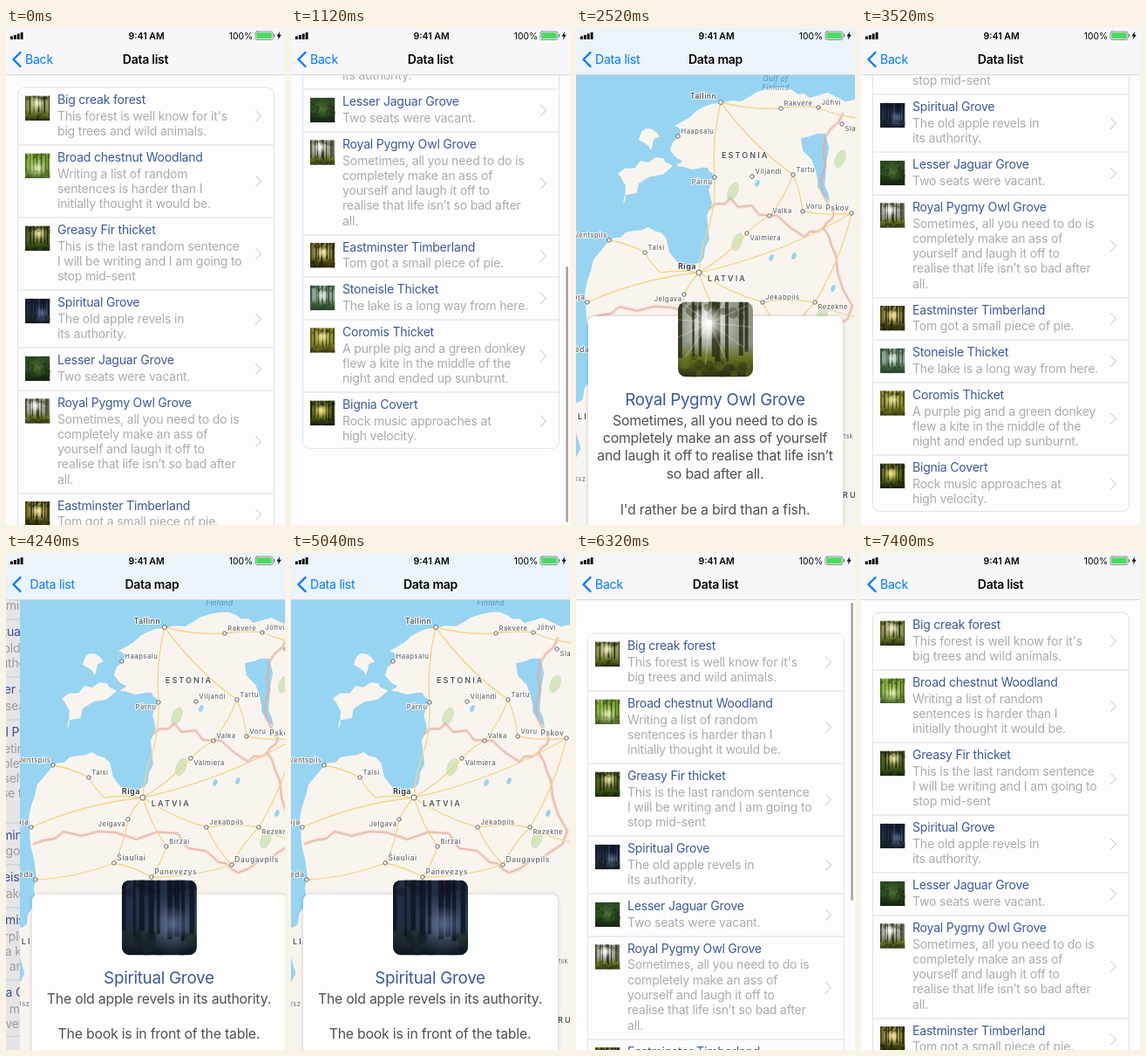
These frames come from a looping animation (320 px wide and 569 px high, 7.44 s). An HTML page with a canvas:

```html
<!DOCTYPE html>
<html lang="en">
<head>
<meta charset="utf-8">
<title>Data list</title>
<style>
html, body { margin: 0; width: 100%; height: 100%; overflow: hidden; background: #fdfcfe; }
canvas { display: block; position: absolute; left: 0; top: 0; width: 320px; height: 569px; }
</style>
</head>
<body>
<canvas id="stage"></canvas>
<script>
const W = 320, H = 569, LOOP = 7440, BAR = 54, MAX = 224;
const FONT = 'Inter, "Liberation Sans", sans-serif';
const canvas = document.getElementById('stage');
const ctx = canvas.getContext('2d');
const dpr = Math.max(1, window.devicePixelRatio || 1);
canvas.width = W * dpr;
canvas.height = H * dpr;

const items = [];
let listEnd = 68;
// look: sky, floor, trunk, light; lx, ly: centre of the light
function item(name, lines, look, lx, ly, trunks = 7) {
  const h = 31.3 + 17.3 * lines.length;
  items.push({ name, lines, look, lx, ly, trunks, top: listEnd, h });
  listEnd += h;
}
item('Big creak forest', ["This forest is well know for it's", 'big trees and wild animals.'],
  ['#8a8f4a', '#5d6d22', '#23260f', '#f4efc4'], .5, .3);
item('Broad chestnut Woodland', ['Writing a list of random', 'sentences is harder than I', 'initially thought it would be.'],
  ['#86b03e', '#6f8f3a', '#38501b', '#e2efb4'], .5, .6);
item('Greasy Fir thicket', ['This is the last random sentence', 'I will be writing and I am going to', 'stop mid-sent'],
  ['#4c5d1c', '#39511a', '#161c0a', '#f0eba4'], .55, .3);
item('Spiritual Grove', ['The old apple revels in', 'its authority.'],
  ['#222d46', '#1c2c2c', '#0f1522', '#5c6f92'], .68, .58, 9);
item('Lesser Jaguar Grove', ['Two seats were vacant.'],
  ['#2c4a20', '#1d3416', '#12220e', '#4d7034'], .5, .45, 0);
item('Royal Pygmy Owl Grove', ['Sometimes, all you need to do is', 'completely make an ass of', 'yourself and laugh it off to',
  'realise that life isn\u2019t so bad after', 'all.'],
  ['#8c9684', '#687221', '#2c2c13', '#ffffff'], .42, .28, 8);
item('Eastminster Timberland', ['Tom got a small piece of pie.'],
  ['#756f2c', '#4a4a16', '#1e1d0b', '#ffefa8'], .5, .38);
item('Stoneisle Thicket', ['The lake is a long way from here.'],
  ['#7fa08c', '#42683d', '#263a2a', '#dcebdc'], .5, .4);
item('Coromis Thicket', ['A purple pig and a green donkey', 'flew a kite in the middle of the', 'night and ended up sunburnt.'],
  ['#8c8c2a', '#686c1e', '#35360f', '#eee49c'], .5, .35);
item('Bignia Covert', ['Rock music approaches at', 'high velocity.'],
  ['#4b5716', '#3d4a10', '#13180a', '#f8ea80'], .45, .4);
listEnd -= 1.6;

const details = {
  3: { y: 391, gulf: 50, lines: ['The old apple revels in its authority.', '', 'The book is in front of the table.'] },
  5: { y: 330, gulf: 61, lines: ['Sometimes, all you need to do is', 'completely make an ass of yourself',
    'and laugh it off to realise that life isn\u2019t', 'so bad after all.', '', "I'd rather be a bird than a fish."] }
};

// Motion
const clamp = v => Math.min(1, Math.max(0, v));
const prog = (t, a, b) => clamp((t - a) / (b - a));
const lerp = (a, b, p) => a + (b - a) * p;
const out = p => 1 - Math.pow(1 - p, 3);
const soft = p => p * p * (3 - 2 * p);

function scrollAt(t) {
  if (t < 1120) return 296 * out(prog(t, 770, 1120));
  if (t < 5960) return lerp(296, MAX, soft(prog(t, 1120, 1560)));
  if (t < 6320) return lerp(MAX, -24, out(prog(t, 5960, 6320)));
  return lerp(-24, 0, soft(prog(t, 6320, 6680)));
}
const thumbAlpha = t => t < 4000
  ? prog(t, 770, 830) * (1 - prog(t, 1560, 1800))
  : prog(t, 5960, 6020) * (1 - prog(t, 6660, 6900));
const visit = (t, a, b) => out(prog(t, a, a + 460)) - out(prog(t, b, b + 440));

// Drawing helpers
function text(s, x, y, size, color, o = {}) {
  ctx.font = `${o.style || ''} ${o.weight || 400} ${size}px ${FONT}`;
  ctx.letterSpacing = (o.gap || 0) + 'px';
  ctx.textAlign = o.align || 'left';
  if (o.halo) {
    ctx.strokeStyle = o.halo;
    ctx.lineWidth = 2;
    ctx.lineJoin = 'round';
    ctx.strokeText(s, x, y);
  }
  ctx.fillStyle = color;
  ctx.fillText(s, x, y);
}
function box(x, y, w, h, r) {
  ctx.beginPath();
  ctx.roundRect(x, y, w, h, r);
}
function rect(x, y, w, h, color) {
  ctx.fillStyle = color;
  ctx.fillRect(x, y, w, h);
}
function trace(pts) {
  ctx.beginPath();
  for (let i = 0; i < pts.length; i += 2) ctx.lineTo(pts[i], pts[i + 1]);
}
function stroke(color, width) {
  ctx.strokeStyle = color;
  ctx.lineWidth = width;
  ctx.lineJoin = ctx.lineCap = 'round';
  ctx.stroke();
}
function line(pts, color, width) {
  trace(pts);
  stroke(color, width);
}
function area(pts, color) {
  trace(pts);
  ctx.closePath();
  ctx.fillStyle = color;
  ctx.fill();
}
function rng(seed) {
  return () => (seed = (seed * 16807) % 2147483647) / 2147483647;
}
// Splits every segment in three with small seeded side steps
function ragged(pts, seed, amount = .22) {
  const rand = rng(seed * 7919), res = [];
  for (let i = 0; i < pts.length - 2; i += 2) {
    const [x, y, x2, y2] = pts.slice(i, i + 4);
    res.push(x, y);
    for (const k of [1 / 3, 2 / 3]) {
      const side = (rand() - .5) * amount;
      res.push(lerp(x, x2, k) - (y2 - y) * side, lerp(y, y2, k) + (x2 - x) * side);
    }
  }
  return [...res, ...pts.slice(-2)];
}

function forest(index, x, y, size, radius) {
  const { look: [sky, floor, trunk, light], lx, ly, trunks } = items[index];
  const rand = rng(index * 977 + 31);
  ctx.save();
  box(x, y, size, size, radius);
  ctx.clip();
  ctx.translate(x, y);
  ctx.scale(size, size);
  const g = ctx.createLinearGradient(0, 0, 0, 1);
  g.addColorStop(0, sky);
  g.addColorStop(.55, sky);
  g.addColorStop(.75, floor);
  g.addColorStop(1, trunk);
  rect(0, 0, 1, 1, g);
  const glow = (r, a) => {
    const q = ctx.createRadialGradient(lx, ly, 0, lx, ly, r);
    q.addColorStop(0, light);
    q.addColorStop(1, light + '00');
    ctx.globalAlpha = a;
    rect(0, 0, 1, 1, q);
    ctx.globalAlpha = 1;
  };
  glow(.42, .8);
  ctx.globalAlpha = .85;
  for (let i = 0; i < trunks; i++) {
    const tx = (i + .2 + rand() * .6) / trunks, w = .025 + rand() * .05;
    rect(tx - w / 2, 0, w, .66 + rand() * .16, trunk);
  }
  ctx.globalAlpha = .4;
  for (let i = 0; i < 36; i++) {
    const s = .03 + rand() * .05, v = rand();
    ctx.beginPath();
    ctx.arc(rand(), trunks ? (i % 2 ? v * .22 : .72 + v * .28) : v, s, 0, 7);
    ctx.fillStyle = i % 4 ? trunk : floor;
    ctx.fill();
  }
  ctx.globalAlpha = 1;
  glow(.24, .9);
  if (index === 5) {
    ctx.globalAlpha = .22;
    for (let a = 0; a < 12; a++) {
      const b = a * Math.PI / 6 + .1;
      line([lx, ly, lx + Math.cos(b) * .55, ly + Math.sin(b) * .55], light, .018);
    }
  }
  ctx.restore();
}

// Map
const SEA = '#97d4f1', LAND = '#f9f5ee';
const coast = ragged([330, 80, 268, 80, 248, 71, 222, 69, 200, 78, 166, 86, 138, 95, 113, 112, 121, 118, 108, 140,
  122, 152, 115, 158, 133, 162, 151, 160, 159, 171, 150, 215, 152, 232, 147, 262, 132, 276, 112, 263, 103, 240,
  83, 228, 57, 234, 36, 246, 17, 278, 11, 315, 19, 372, 17, 390, 8, 425, -9, 432, -9, 580, 330, 580], 3);
const hiiumaa = ragged([72, 128, 80, 115, 96, 124, 86, 140, 72, 128], 5, .5);
const saaremaa = ragged([48, 167, 74, 152, 100, 149, 111, 158, 72, 178, 54, 203, 57, 180, 48, 167], 6, .35);
const peipus = ragged([258, 126, 286, 121, 286, 170, 291, 199, 277, 182, 275, 164, 258, 126], 8);
const south = ragged([16, 333, 50, 319, 110, 320, 181, 321, 228, 354, 250, 366, 286, 350, 317, 318, 298, 260, 284, 229,
  262, 239, 210, 214, 177, 195, 153, 207], 9, .3);
const east = ragged([306, 98, 286, 125, 281, 174, 296, 213, 284, 229], 4);

// x and y of the dot, side of the label, size of the label
const towns = {
  Rakvere: [235, 92, 'ne'], 'J\u00f5hvi': [278, 91, 'ne'], Haapsalu: [117, 124, 'ne'], Viljandi: [202, 170, 'ne'],
  Tartu: [249, 168, 'ne'], 'P\u00e4rnu': [159, 171, 'sw'], Valka: [222, 215, 'ne'], Voru: [260, 210, 'ne'],
  Sla: [305, 110, 'se'], Valmiera: [196, 235, 'se'], Ventspils: [38, 243, 'nw'], Talsi: [79, 257, 'ne'],
  Jelgava: [124, 305, 'sw'], Jekabpils: [214, 314, 'ne'], Rezekne: [274, 314, 'se'], Birzai: [168, 336, 'ne']
};
const bigTowns = {
  Pskov: [316, 212, 'nw'], '\u0160iauliai': [108, 355, 'ne'], Panevezys: [151, 371, 'ne'],
  Daugavpils: [243, 357, 'ne'], Klaip\u0117da: [18, 374, 'nw'], Liepaja: [13, 314, 'nw']
};
const stops = {
  ...towns, ...bigTowns, Tallinn: [166, 85], Riga: [141, 280], Narva: [322, 103], bay: [153, 225],
  fork: [97, 280], edge: [322, 331]
};
const roads = ['Tallinn Rakvere J\u00f5hvi Narva', 'Tallinn Tartu Voru Pskov', 'Tallinn P\u00e4rnu bay Riga',
  'Riga Valmiera Valka Tartu', 'Riga fork Talsi Ventspils', 'Riga Liepaja', 'Riga Jelgava \u0160iauliai',
  'Riga Jekabpils Rezekne edge', 'Riga Pskov', 'Jekabpils Daugavpils', 'Riga Birzai Panevezys',
  'Klaip\u0117da \u0160iauliai Panevezys Daugavpils Rezekne Pskov'].map(s => s.split(' ').map(n => stops[n]));

function road(way) {
  ctx.beginPath();
  ctx.moveTo(way[0][0], way[0][1]);
  for (let i = 1; i < way.length; i++) {
    const [x, y] = way[i - 1], [x2, y2] = way[i], bend = i % 2 ? .08 : -.08;
    ctx.quadraticCurveTo((x + x2) / 2 - (y2 - y) * bend, (y + y2) / 2 + (x2 - x) * bend, x2, y2);
  }
  stroke('#f5d38a', 1.3);
}
function dot(x, y, r = 2.2) {
  ctx.beginPath();
  ctx.arc(x, y, r, 0, 7);
  ctx.fillStyle = '#fff';
  ctx.fill();
  stroke('#666', 1);
}
function blob(x, y, rx, ry, color) {
  ctx.beginPath();
  ctx.ellipse(x, y, rx, ry, .4, 0, 7);
  ctx.fillStyle = color;
  ctx.fill();
}
function drawMap(gulf) {
  rect(0, 0, W, H, SEA);
  for (const land of [coast, hiiumaa, saaremaa]) area(land, LAND);
  for (const [x, y] of [[185, 245], [282, 328], [180, 187], [303, 150]]) blob(x, y, 6, 11, '#d5e5c0');
  area(peipus, SEA);
  for (const [x, y] of [[208, 178], [224, 263], [295, 298], [250, 261]]) blob(x, y, 2.5, 4, SEA);
  for (const b of [south, east]) {
    line(b, 'rgba(232,160,145,.3)', 4);
    line(b, '#dfa99d', 1);
  }
  roads.forEach(road);

  const halo = 'rgba(255,255,255,.8)';
  const place = (set, size, gap) => {
    for (const [name, [x, y, side]] of Object.entries(set)) {
      const left = side[1] === 'w';
      dot(x, y);
      text(name, x + (left ? -2.5 : 3.5), y + (side[0] === 'n' ? -3 : 8), size, '#666',
        { gap, weight: 500, halo, align: left ? 'right' : 'left' });
    }
  };
  place(towns, 7.6, .5);
  place(bigTowns, 8.4, .6);
  dot(166, 85, 2.5);
  dot(141, 280, 3);
  text('Tallinn', 131, 81, 8.6, '#444', { gap: .5, weight: 500, halo });
  text('Riga', 117, 276, 9, '#333', { gap: .5, weight: 600, halo });
  text('tsk', 307, 470, 7.6, '#666', { halo });
  text('lsz', 0, 519, 7.6, '#666', { gap: .5, halo });
  for (const [s, x, y] of [['ESTONIA', 167, 149], ['LATVIA', 151, 290], ['LI', 2, 448], ['RU', 306, 538]])
    text(s, x, y, 9, '#555', { gap: 2.1, weight: 600, halo });
  const water = { align: 'center', style: 'italic', gap: .3 };
  text('Gulf of', 229, gulf, 8.4, '#5b8fb8', water);
  text('Finland', 229, gulf + 10, 8.4, '#5b8fb8', water);
}

function drawDetail(index) {
  const d = details[index];
  drawMap(d.gulf);
  ctx.save();
  ctx.shadowColor = 'rgba(0,0,0,.18)';
  ctx.shadowBlur = 5 * dpr;
  box(14, d.y, 292, H - d.y + 20, 7);
  ctx.fillStyle = '#fefdfe';
  ctx.fill();
  ctx.restore();
  forest(index, 117, d.y - 16.5, 86, 9);
  text(items[index].name, 159.5, d.y + 102, 18.8, '#3b5998', { align: 'center', gap: -.25 });
  d.lines.forEach((s, i) =>
    text(s, 159.5, d.y + 124.5 + i * 20.4, 15.8, '#505050', { align: 'center', gap: -.2 }));
}

function drawList(offset, alpha) {
  rect(0, 0, W, H, '#fdfcfe');
  ctx.save();
  ctx.translate(0, -offset);
  box(13.5, 68, 294, listEnd - 68, 8);
  ctx.fillStyle = '#fefdfe';
  ctx.fill();
  stroke('#dce4e9', 1);
  items.forEach((it, i) => {
    if (it.top - offset > H || it.top + it.h - offset < 0) return;
    if (i) rect(14, Math.round(it.top) - .5, 293, 1, '#d3e0e8');
    forest(i, 22, it.top + 9.5, 28.5, 0);
    text(it.name, 59, it.top + 19, 14, '#3b5998', { gap: -.19 });
    it.lines.forEach((s, n) => text(s, 59, it.top + 37.7 + n * 17.3, 14, '#ababab', { gap: -.17 }));
    const cy = it.top + it.h / 2;
    line([286.5, cy - 6, 292.5, cy, 286.5, cy + 6], '#cdd6df', 1.2);
  });
  ctx.restore();
  if (alpha > 0) {
    const over = Math.max(-offset, offset - MAX, 0), len = 365 - over;
    const y = lerp(57, 566 - len, clamp(offset / MAX));
    ctx.globalAlpha = alpha;
    box(315.3, y, 2.6, len, 1.3);
    ctx.fillStyle = '#a3a3a6';
    ctx.fill();
    ctx.globalAlpha = 1;
  }
}

function drawBar(p) {
  rect(0, 0, W, BAR, '#f7f7f9');
  ctx.globalAlpha = p;
  rect(0, 0, W, BAR, '#eaf4f9');
  ctx.globalAlpha = 1;
  rect(0, BAR - .5, W, .5, '#b4b8bc');

  for (let i = 0; i < 4; i++) rect(5 + i * 3.9, 9.5 - i * 1.5, 2.8, 3.5 + i * 1.5, '#000');
  text('9:41 AM', 161, 12.8, 10.5, '#000', { weight: 600, align: 'center' });
  text('100%', 283, 12.8, 10.3, '#000', { align: 'right' });
  box(286, 4, 20, 9.5, 2);
  stroke('#777', .8);
  box(287.2, 5.2, 17.6, 7.1, 1.2);
  ctx.fillStyle = '#4cd964';
  ctx.fill();
  rect(307, 7, 1.2, 3.5, '#777');
  area([314.2, 4, 310.5, 9.4, 312.8, 9.4, 311.8, 13.5, 315.8, 7.8, 313.4, 7.8], '#000');

  const blue = '#007aff', head = { weight: 600, align: 'center', gap: -.25 };
  line([16.5, 28, 8.5, 36, 16.5, 44], blue, 2.4);
  ctx.globalAlpha = 1 - p;
  text('Back', 22 - 50 * p, 41, 14, blue, { gap: -.2 });
  text('Data list', 160 - 112 * p, 41, 14, '#000', head);
  ctx.globalAlpha = p;
  text('Data list', 22 + 112 * (1 - p), 41, 14, blue, { gap: -.2 });
  text('Data map', 160 + 150 * (1 - p), 41, 14, '#000', head);
  ctx.globalAlpha = 1;
}

function draw(t) {
  ctx.setTransform(dpr, 0, 0, dpr, 0, 0);
  const index = t < 3600 ? 5 : 3;
  const p = index === 5 ? visit(t, 1800, 2950) : visit(t, 3950, 5400);
  if (p < 1) {
    ctx.save();
    ctx.translate(-96 * p, 0);
    drawList(scrollAt(t), thumbAlpha(t));
    ctx.restore();
    if (p > 0) rect(0, 0, W, H, `rgba(0,0,0,${.1 * p})`);
  }
  if (p > 0) {
    ctx.save();
    ctx.translate(W * (1 - p), 0);
    ctx.beginPath();
    ctx.rect(0, 0, W, H);
    ctx.clip();
    drawDetail(index);
    ctx.restore();
  }
  drawBar(p);
}

const start = performance.now();
function tick() {
  draw((performance.now() - start) % LOOP);
  requestAnimationFrame(tick);
}
tick();
</script>
</body>
</html>
```
